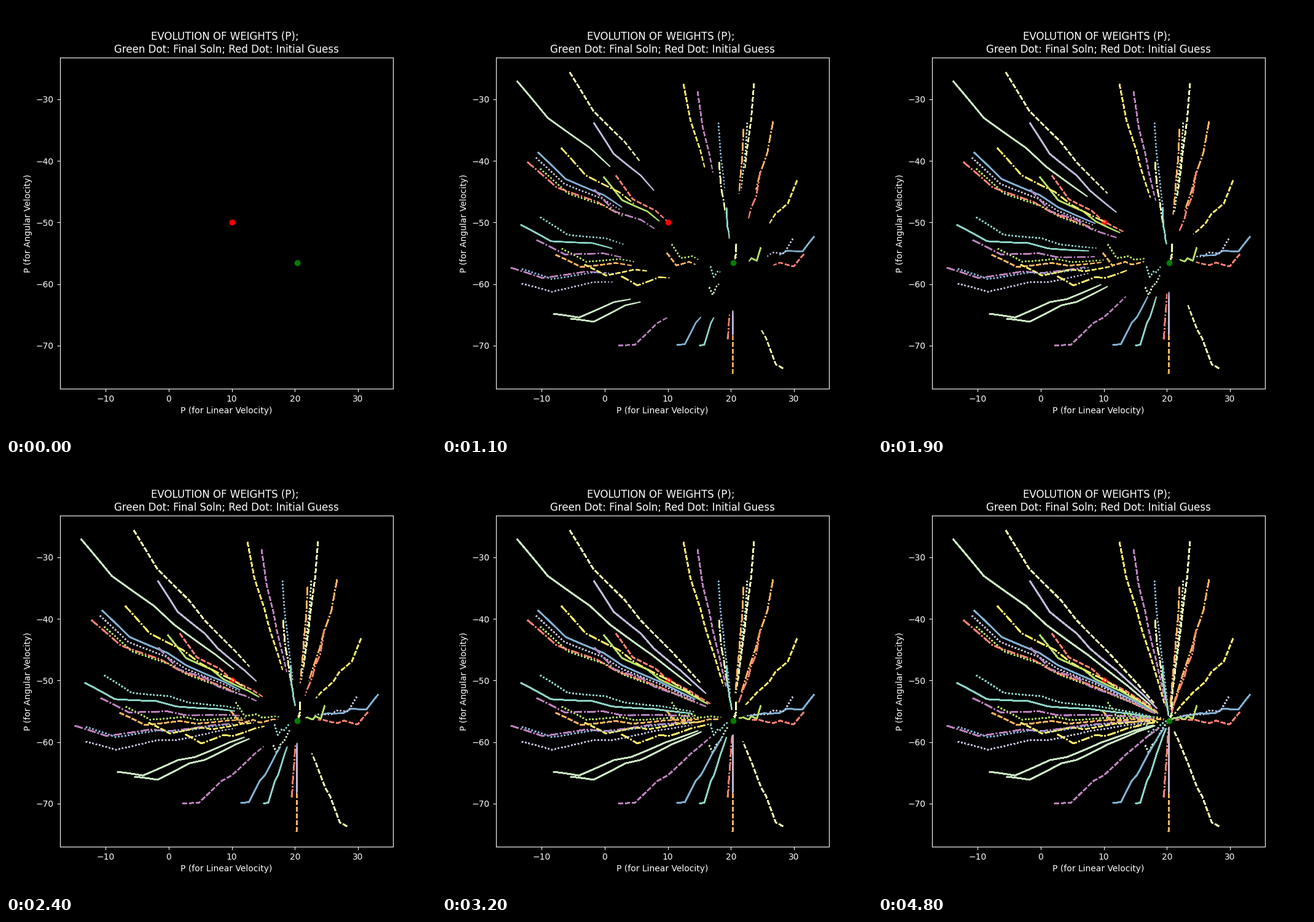
These frames come from a looping animation (700x700 px, 4.9 s). A matplotlib script:

```python
import numpy as np
import matplotlib.pyplot as plt
from matplotlib.animation import FuncAnimation
from matplotlib.collections import LineCollection

plt.style.use("dark_background")

SIZE, FRAMES = 700, 49
DECAY = 0.95                  # share of the error left after each step
GOAL = np.array([474, 418])
STYLES = ["-", "--", ":", "-."]

# Where each run starts, in stage pixels; order sets colour and line style.
STARTS = np.array([
    (128, 356), (208, 108), (153, 247), (139, 254), (156, 238),
    (185, 405), (160, 265), (112, 426), (122, 122), (393, 127),
    (160, 344), (451, 254), (247, 190), (283, 276), (130, 428),
    (539, 188), (263, 278), (416, 139), (497, 190), (194, 231),
    (463, 328), (508, 126), (130, 452), (464, 541), (606, 375),
    (473, 599), (195, 395), (154, 381), (181, 501), (232, 421),
    (437, 424), (479, 387), (473, 533), (589, 404), (450, 190),
    (491, 200), (519, 393), (287, 553), (435, 458), (292, 440),
    (419, 553), (555, 590), (571, 379), (518, 270), (382, 552),
    (366, 402), (374, 388), (248, 299), (209, 509), (578, 284),
])
count = len(STARTS)

# Every run closes in on the goal while a shared bias pushes it downwards.
steps = np.arange(FRAMES)
drift = np.interp(steps, [0, 3, 8, 11, 19, 32], [0, 18, 9, 12, 4, 0])
paths = GOAL + (STARTS[:, None] - GOAL) * (DECAY ** steps)[:, None]
paths[..., 1] += drift
paths[..., 1] = SIZE - paths[..., 1]
segments = [p[:step + 1] for step in steps[1:] for p in paths]

fig, ax = plt.subplots(figsize=(7, 7), dpi=100)
ax.set(xlim=(-17.25, 35.53), ylim=(-77.0, -23.24),
       xlabel="P (for Linear Velocity)", ylabel="P (for Angular Velocity)")
ax.set_title("EVOLUTION OF WEIGHTS (P); \n"
             "Green Dot: Final Soln; Red Dot: Initial Guess")
ax.scatter(10, -50, color="red")
ax.scatter(20.35, -56.6, color="green")

lines = LineCollection([], linewidths=1.5, zorder=2, transform=None,
                       colors=[f"C{i % 10}" for i in range(count)],
                       linestyles=[STYLES[i % 4] for i in range(count)])
ax.add_collection(lines, autolim=False)


def update(step):
    # Every step is drawn over the earlier ones, which hardens the edges.
    lines.set_segments(segments[:count * step])
    return [lines]


anim = FuncAnimation(fig, update, frames=FRAMES, interval=100, repeat=True,
                     repeat_delay=0)
plt.show()
```
